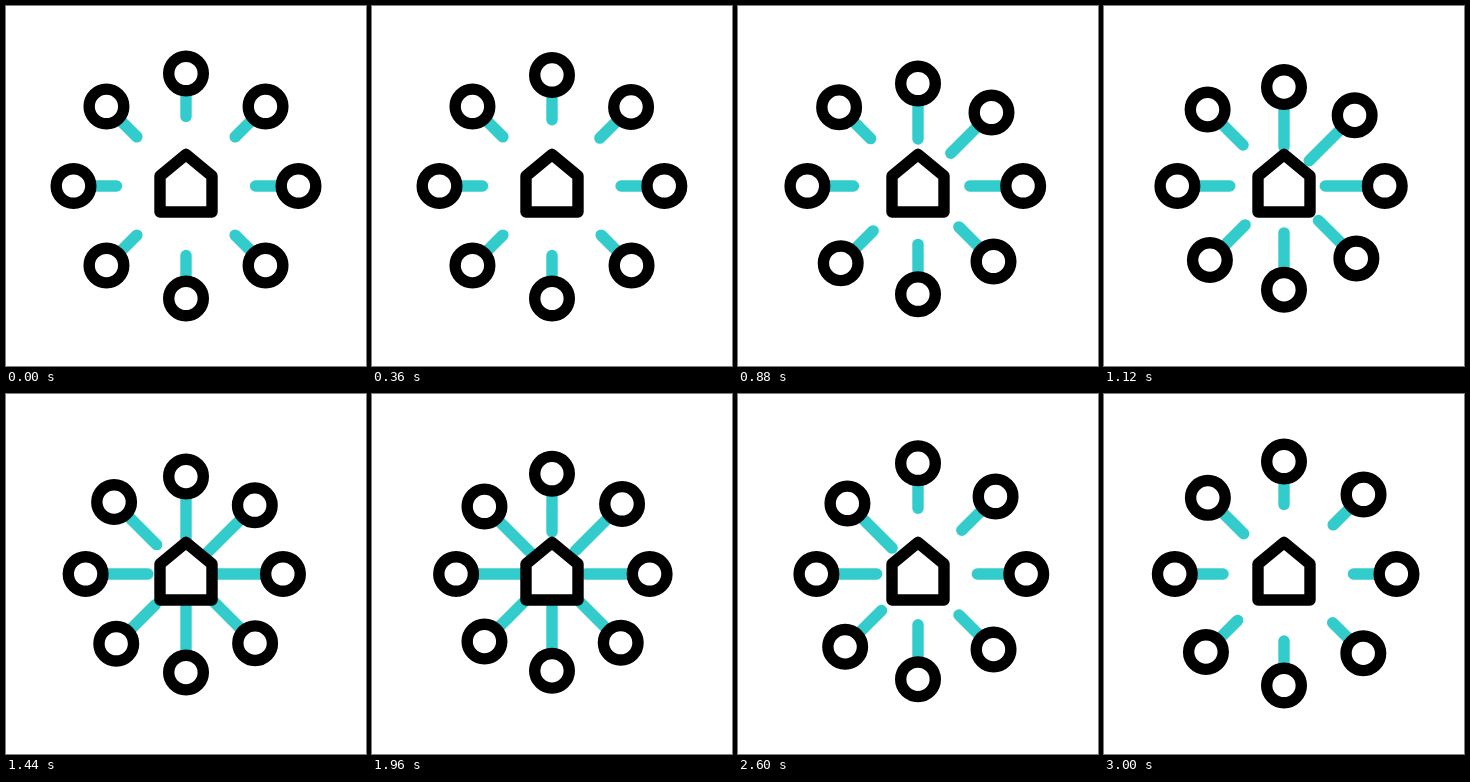
Write an HTML page that moves like this. It is 360 by 360 pixels and loops after 3020 ms.

```html
<!DOCTYPE html>
<html lang="en">
<head>
<meta charset="utf-8">
<title>Connected home</title>
<style>
  html, body { margin: 0; width: 100%; height: 100%; overflow: hidden; background: #fff; }
  svg { display: block; width: 100%; height: 100%; }
  line, circle, path { stroke-width: 11.4; stroke-linecap: round; stroke-linejoin: round; }
  line { stroke: #33cccc; }
  circle, path { stroke: #000; fill: #fff; }
</style>
</head>
<body>
<svg viewBox="0 0 360 360">
  <g id="nodes" transform="translate(180 180)"></g>
  <path d="M154 206V170L180 148.5L206 170V206Z"/>
</svg>
<script>
const LOOP = 3020, START = 120, STAGGER = 83, EASE = 1250, HOLD = 240;
const RADIUS = 112.5, LINE_END = 69.5;

// Inward travel of [ring, line end], clockwise from the top
const travel = [
  [15.1, 34], [15.2, 41], [15.8, 38], [15.6, 32],
  [15.7, 41], [17, 32], [16.6, 43], [17, 44]
];

function add(parent, tag, attrs) {
  const el = document.createElementNS('http://www.w3.org/2000/svg', tag);
  for (const key in attrs) el.setAttribute(key, attrs[key]);
  return parent.appendChild(el);
}

const root = document.getElementById('nodes');
const nodes = travel.map(([ring, tip], i) => {
  const g = add(root, 'g', { transform: `rotate(${i * 45})` });
  return { ring, tip, line: add(g, 'line', {}), circle: add(g, 'circle', { r: 17.3 }) };
});

function smooth(x) {
  const u = Math.min(1, Math.max(0, x));
  return u * u * (3 - 2 * u);
}

// Ease in, hold, ease back out
const pull = t => smooth(t / EASE) - smooth((t - EASE - HOLD) / EASE);

function draw(now) {
  const t = now % LOOP;
  nodes.forEach(({ ring, tip, line, circle }, i) => {
    const p = pull(t - START - i * STAGGER);
    const y = -RADIUS + ring * p;
    circle.setAttribute('cy', y);
    line.setAttribute('y1', y);
    line.setAttribute('y2', -LINE_END + tip * p);
  });
}

const begin = performance.now();
function tick() {
  draw(performance.now() - begin);
  requestAnimationFrame(tick);
}
tick();
</script>
</body>
</html>
```
